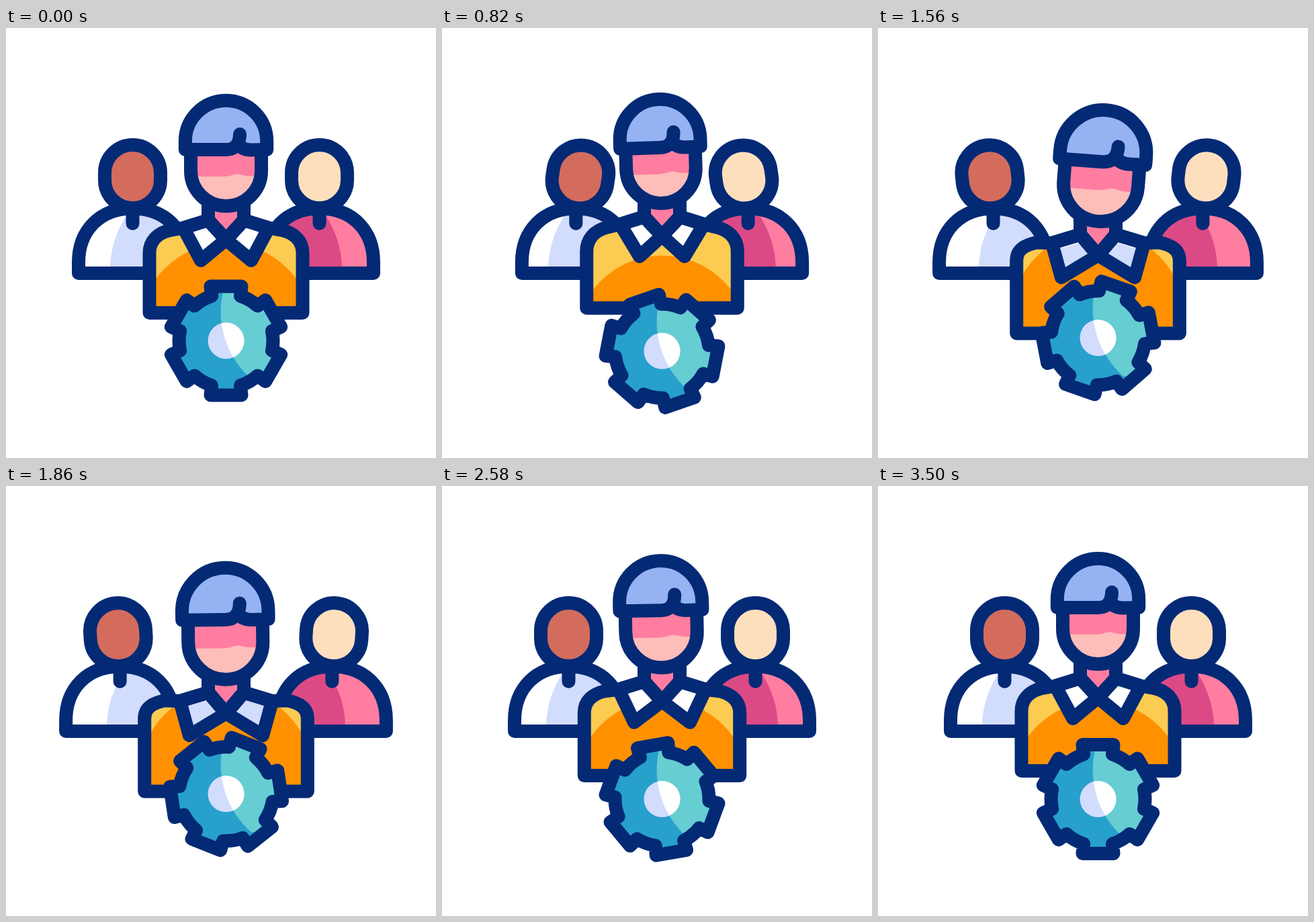
Recreate the animation shown at these times as an HTML page. Size 640 by 640 pixels, loop 3.6 s.

```html
<!DOCTYPE html>
<html lang="en">
<head>
<meta charset="utf-8">
<title>Team and gear</title>
<style>
  html, body { margin: 0; width: 100%; height: 100%; overflow: hidden; background: #fff; }
  svg { display: block; width: 100vw; height: 100vh; }
  .line { fill: none; stroke: #042a75; stroke-width: 20; stroke-linecap: round; stroke-linejoin: round; }
</style>
</head>
<body>
<svg id="stage" viewBox="0 0 640 640"></svg>
<script>
const LOOP = 3600, START = 120, MID = 327.5;

// Eased moves, each [end time, value]; a move starts where the last one ended
function track(...moves) {
  return t => {
    let from = 0, since = START;
    for (const [end, to] of moves) {
      if (t < end) {
        const u = Math.max(0, (t - since) / (end - since));
        return from + (to - from) * (1 - Math.cos(Math.PI * u)) / 2;
      }
      from = to;
      since = end;
    }
    return from;
  };
}

const lift      = track([560, -24.5], [1250, 30.5], [2200, 30.5], [2760, 0]);
const headTilt  = track([570, -4], [1300, 4.5], [1500, 4.5], [2160, -4.6], [2780, 0]);
const bellyRise = track([600, 24], [1560, -18], [2160, -18], [2700, 0]);
const collarDim = track([400, 0], [1600, 48], [2160, 60], [2800, 0]);
const sideShift = track([560, 14.5], [1800, -20], [2200, 0]);
const sideTilt  = track([580, 10], [1650, -6.4], [2160, 1.8], [2580, 0]);
const sideLight = track([590, 7], [1200, -5], [2160, -5], [2580, 0]);
const gearDrop  = track([600, 20], [1150, 6.5], [1600, -4.5], [2160, -10.5], [2600, 0.5]);
const gearTurn  = track([620, -23], [1650, 20], [2160, 24], [2600, -10], [3340, 0]);

function gearPath() {
  let d = "";
  for (let i = 0; i < 6; i++) {
    const a = i * Math.PI / 3, c = Math.cos(a), s = Math.sin(a);
    const pt = (x, y) => `${(x * c - y * s).toFixed(2)} ${(x * s + y * c).toFixed(2)}`;
    d += (i ? "A70 70 0 0 1 " : "M") + pt(-21.5, -66.6)
       + "L" + pt(-23, -81) + "L" + pt(23, -81) + "L" + pt(21.5, -66.6);
  }
  return d + "A70 70 0 0 1 -21.5 -66.6Z";
}

const TORSO = "M108 365V349C108 301 140 268.5 188.5 268.5S269 301 269 349V365Z";
const HEAD = 'x="147" y="174" width="83" height="94" rx="41.5"';
const side = (flip, skin, base, shade) => `
  <g ${flip ? `transform="matrix(-1 0 0 1 ${2 * MID} 0)"` : ""}><g class="side">
    <g class="sideHead"><rect ${HEAD} fill="${skin}"/><rect ${HEAD} class="line"/></g>
    <g clip-path="url(#torso)">
      <path d="${TORSO}" fill="${base}"/>
      <path class="sideShade" d="M155 366C154 328 165 299 186 268H320V366Z" fill="${shade}"/>
    </g>
    <path class="line" d="${TORSO}M188.5 269V291"/>
  </g></g>`;

const FACE = "M-52.5 181V212.5A52.5 52.5 0 0 0 52.5 212.5V181";
const HAIR = "M-60.7 181V168.7A60.7 60.7 0 0 1 60.7 168.7V181";
const SHADE = "M37.5 57A134 134 0 0 1 -1 -86H110V57Z";
const GEAR = gearPath();

const svg = document.getElementById("stage");
svg.innerHTML = `
  <defs>
    <clipPath id="torso"><path d="${TORSO}"/></clipPath>
    <clipPath id="bodyClip"><path class="body"/></clipPath>
    <clipPath id="collarClip"><path class="collar"/></clipPath>
    <clipPath id="faceClip"><path d="${FACE}Z"/></clipPath>
    <clipPath id="gearClip"><path class="spin" d="${GEAR}"/></clipPath>
    <clipPath id="hubClip"><circle r="27"/></clipPath>
  </defs>
  <rect width="640" height="640" fill="#fff"/>
  ${side(false, "#d46c5d", "#fff", "#d2dcfd")}
  ${side(true, "#fddfbd", "#ff7da0", "#dc4a85")}
  <g transform="translate(${MID} 0)">
    <path class="neck" fill="#ff7da0"/>
    <g clip-path="url(#bodyClip)">
      <path class="body" fill="#fccb52"/>
      <path class="belly" d="M-129 449A129 129 0 0 1 129 449V600H-129Z" fill="#ff9100"/>
    </g>
    <path class="collar" fill="#fff"/>
    <g clip-path="url(#collarClip)"><path class="collarShade" fill="#d2dcfd"/></g>
    <path class="neck line"/>
    <path class="body line"/>
    <path class="collar line"/>
    <g class="head">
      <path d="${FACE}Z" fill="#fdbdb9"/>
      <path clip-path="url(#faceClip)" fill="#ff7da0"
        d="M-60 175V221H-5C8 221 10 217.5 17 217.5C24 217.5 25 220.5 40 220.5H60V175Z"/>
      <path class="line" d="${FACE}"/>
      <path d="${HAIR}Z" fill="#95b2f3"/>
      <path class="line" d="${HAIR}M-60.7 181H0C13 181 20.5 173 20.5 158M18 171C21 179 29 181.5 38 181.5L60.7 181"/>
    </g>
  </g>
  <g class="gear">
    <g clip-path="url(#gearClip)">
      <rect x="-110" y="-110" width="220" height="220" fill="#27a0cc"/>
      <path d="${SHADE}V110H37.5Z" fill="#66cdd2"/>
    </g>
    <path class="spin line" d="${GEAR}"/>
    <circle r="27" fill="#d2dcfd"/>
    <path d="${SHADE}" fill="#fff" clip-path="url(#hubClip)"/>
  </g>`;

const cache = {};
function set(cls, attr, value) {
  const list = cache[cls] || (cache[cls] = svg.querySelectorAll("." + cls));
  list.forEach(el => el.setAttribute(attr, value));
}

// Positive s squashes the leader down and wide, negative s stretches him up
function drawLeader(t) {
  const s = lift(t);
  const half = 114 + .24 * s, arm = 335 + .38 * s, base = 424 + s;
  const shX = 85.5 + .2 * s, shY = 301.5 + .58 * s;
  const outX = 63.5 + .17 * s, outY = 297.5 + .74 * s;
  const neckX = 26.5, neckY = 286 + .7 * s;
  const tipX = 37.5 + .56 * s, tipY = 346 + .83 * s;
  const knot = 315 + .76 * s;
  const chin = 265 + (s < 0 ? .57 : .75) * s;

  set("body", "d", `M${-half} ${base}V${arm}C${-half} ${arm - 19} ${-shX - 15} ${shY + 4} ${-shX} ${shY}`
    + `L${-outX} ${outY}L${-neckX} ${neckY}L0 ${knot}L${neckX} ${neckY}L${outX} ${outY}L${shX} ${shY}`
    + `C${shX + 15} ${shY + 4} ${half} ${arm - 19} ${half} ${arm}V${base}Z`);

  const flap = m => `M${-neckX * m} ${neckY}L0 ${knot}L${-tipX * m} ${tipY}L${-outX * m} ${outY}Z`;
  set("collar", "d", flap(1) + flap(-1));
  const drop = 60 - collarDim(t);
  const fold = m => `M${-outX * m} ${outY + drop}L${-neckX * m} ${neckY + drop}L0 ${neckY + drop - 9}V480H${-outX * m}Z`;
  set("collarShade", "d", fold(1) + fold(-1));
  set("neck", "d", `M${-neckX} ${chin - 8}V${neckY}L0 ${knot}L${neckX} ${neckY}V${chin - 8}Z`);
  set("belly", "transform", `translate(0 ${bellyRise(t)})`);

  const k = 1 + .0019 * s;
  set("head", "transform", `translate(0 ${chin}) rotate(${headTilt(t)}) scale(${k}) translate(0 -265)`);
  svg.querySelectorAll(".head .line").forEach(el => { el.style.strokeWidth = 20 / k; });
}

function draw(t) {
  const x = sideShift(t);
  set("side", "transform", `translate(${x} 0)`);
  set("sideHead", "transform", `rotate(${sideTilt(t)} 188.5 268)`);
  set("sideShade", "transform", `translate(${sideLight(t) - x} 0)`);
  drawLeader(t);
  set("gear", "transform", `translate(${MID} ${465.5 + gearDrop(t)})`);
  set("spin", "transform", `rotate(${gearTurn(t)})`);
}

const start = performance.now();
function tick() {
  draw((performance.now() - start) % LOOP);
  requestAnimationFrame(tick);
}
tick();
</script>
</body>
</html>
```
